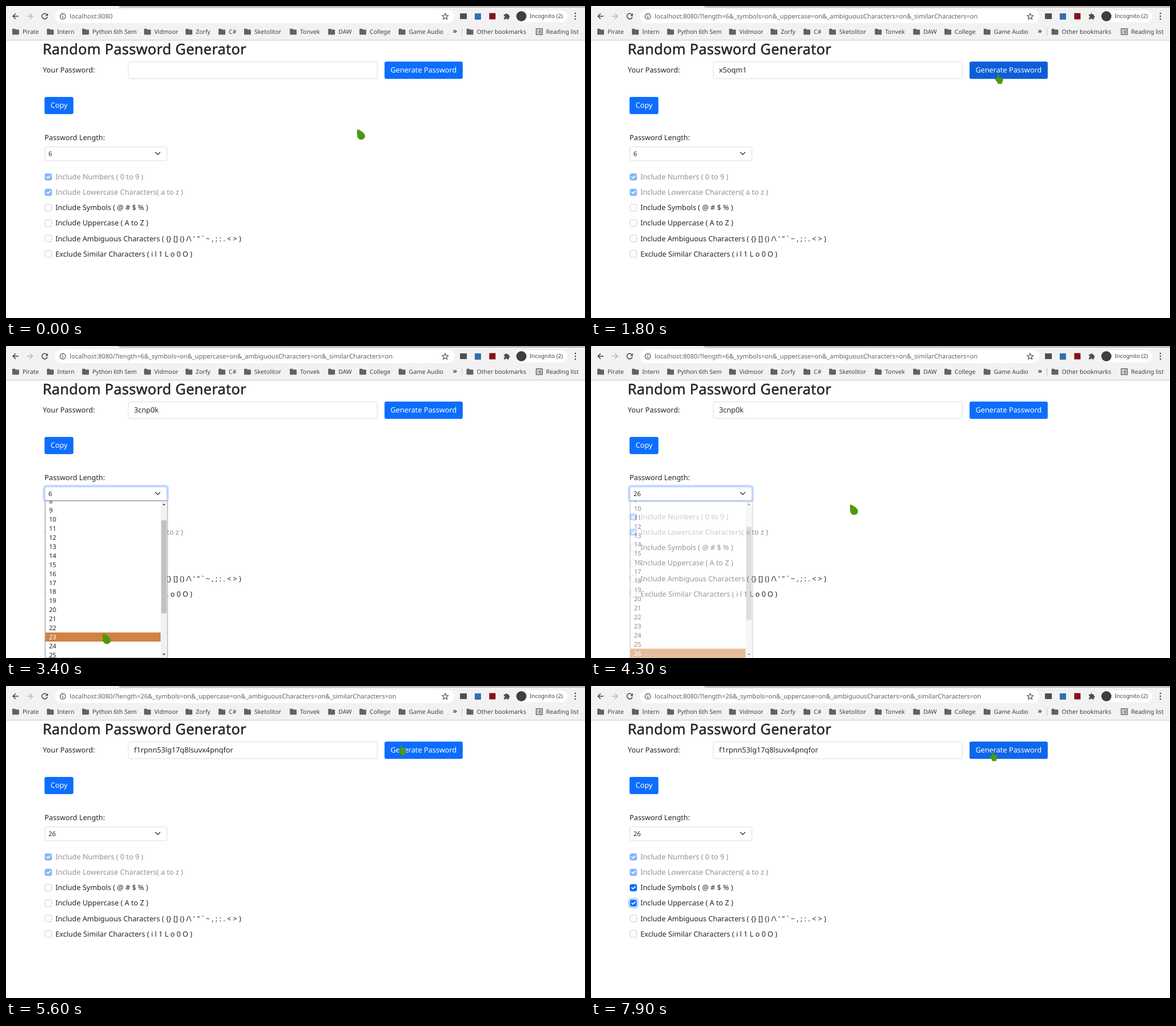
Animation, 1019 px wide and 549 px high, one loop 8000 ms. Source, as an HTML page:

```html
<!DOCTYPE html>
<html lang="en">
<head>
<meta charset="utf-8">
<title>Random Password Generator</title>
<style>
  html, body { margin: 0; width: 100%; height: 100%; overflow: hidden; background: #fff; }
  svg { display: block; }
  text { font: 12.74px "Noto Sans", sans-serif; fill: #212529; text-rendering: geometricPrecision; }
  .title { font-size: 25.47px; letter-spacing: .28px; stroke: #212529; stroke-width: .5; }
  .small { font-size: 11.15px; }
  .url { font-size: 11.15px; fill: #5f6368; }
  .mark { font-size: 10.5px; fill: #3c4043; }
  .white { fill: #fff; }
  .icon { fill: none; stroke: #3c4043; stroke-width: 1.5; }
  .field { fill: #fff; stroke: #ced4da; stroke-width: .8; }
  .ring { fill: none; stroke: #0d6efd; stroke-opacity: .25; stroke-width: 3.2; }
</style>
</head>
<body>
<svg id="stage" width="1019" height="549" viewBox="0 0 1019 549">
  <!-- browser bar -->
  <rect width="1019" height="60" fill="#f2f2f2"/>
  <path d="M0 0H4Q1 0 0 3ZM197 0H1019V3H205Q199 3 197 0Z" fill="#bdbdbd"/>
  <rect y="59.6" width="1019" height="1" fill="#c6c6c6"/>
  <rect x="86" y="6" width="703" height="24" rx="12" fill="#fff"/>
  <path class="icon" d="M22 18H12.5M17 13.2L12.2 18L17 22.8"/>
  <path class="icon" style="stroke:#b5b7b9" d="M37 18H46.5M42 13.2L46.8 18L42 22.8"/>
  <g id="reload">
    <path class="icon" d="M71.5 14.6A4.8 4.8 0 1 0 72.7 19.2"/>
    <path d="M73.6 12.8V17.4H69Z" fill="#3c4043"/>
  </g>
  <path id="stop" class="icon" d="M64 14L72 22M72 14L64 22"/>
  <circle class="icon" cx="100" cy="18.2" r="4.8" style="stroke-width:1.1"/>
  <path class="icon" style="stroke-width:1.2" d="M100 15.2V16.6M100 17.6V21"/>
  <text id="url" class="url" x="112.1" y="22"></text>
  <path class="icon" style="stroke-width:1.1" d="M773 13L774.5 16.6L778.3 16.9L775.4 19.4L776.3 23.2L773 21.1L769.7 23.2L770.6 19.4L767.7 16.9L771.5 16.6Z"/>
  <rect x="799" y="13" width="12" height="10" fill="#4b4f53"/>
  <rect x="825" y="13" width="11" height="11" fill="#2f6fae"/>
  <rect x="850.5" y="12.5" width="11" height="11" fill="#86101a"/>
  <path d="M876.3 14.8H879A1.7 1.7 0 0 1 882.4 14.8H885V17.3A1.7 1.7 0 0 1 885 20.7V23.6H882.2A1.7 1.7 0 0 0 878.8 23.6H876.3V20.8A1.7 1.7 0 0 0 876.3 17.4Z" fill="#4b4f53"/>
  <rect x="896" y="7.5" width="92" height="21.5" rx="10.7" fill="#fff"/>
  <circle cx="907" cy="18" r="9" fill="#3c4043"/>
  <text class="mark" x="921.7" y="21.3" style="font-size:9.85px">Incognito (2)</text>
  <path d="M1002 13v.01M1002 18v.01M1002 23v.01" stroke="#3c4043" stroke-width="2.6" stroke-linecap="round"/>
  <g id="bookmarks"></g>
  <text class="mark" x="786.5" y="48" style="font-size:12px;font-weight:600">»</text>
  <path d="M802.5 39V52" stroke="#c4c6c9"/>
  <path class="icon" style="stroke-width:1.2" d="M933.2 40.2H943.8V50.5H933.2ZM935 43H936.3M937.5 43H942M935 45.4H936.3M937.5 45.4H942M935 47.8H936.3M937.5 47.8H942"/>
  <text class="mark" x="950.5" y="49">Reading list</text>

  <!-- page -->
  <text class="title" x="64.4" y="85.3">Random Password Generator</text>
  <text x="64.8" y="117.3">Your Password:</text>
  <rect class="field" x="215.2" y="98.2" width="438.2" height="29.6" rx="3"/>
  <text id="password" x="225.3" y="117.3"></text>
  <rect id="buttonRing" class="ring" x="664.7" y="96.2" width="140.6" height="33.6" rx="4.8"/>
  <rect id="button" x="666.2" y="97.8" width="137.6" height="30.4" rx="3.2"/>
  <text class="white" x="734.9" y="117.3" text-anchor="middle">Generate Password</text>
  <rect x="67.8" y="160" width="50.8" height="30.3" rx="3.2" fill="#0d6efd"/>
  <text class="white" x="93.3" y="179.3" text-anchor="middle">Copy</text>
  <text x="67.8" y="235.5">Password Length:</text>
  <rect id="selectRing" class="ring" x="66.5" y="246" width="218.5" height="28" rx="4.8"/>
  <rect id="select" class="field" x="68.4" y="247.9" width="214.8" height="24.2" rx="3"/>
  <text id="length" class="small" x="74.8" y="263.6"></text>
  <path d="M263 257.6L267 261.6L271 257.6" fill="none" stroke="#343a40" stroke-width="1.4" stroke-linecap="round" stroke-linejoin="round"/>
  <g id="options"></g>

  <!-- length list -->
  <g id="popup">
    <rect x="68.9" y="272.4" width="215.2" height="276.6" fill="#fff" stroke="#767676" stroke-width=".9"/>
    <svg x="69.3" y="272.8" width="203" height="277" viewBox="69.3 272.8 203 277"><g id="list"></g></svg>
    <rect x="272.3" y="272.8" width="11.4" height="276" fill="#f1f1f1"/>
    <rect id="thumb" x="273.3" y="283.7" width="9.4" height="163.5" fill="#c1c1c1"/>
    <path d="M275.3 280L278 277L280.7 280ZM275.3 541.2L278 544.2L280.7 541.2Z" fill="#505050"/>
  </g>

  <g id="cursor" fill="#4e9a06" stroke="#3f8205" stroke-width=".5">
    <path id="leaf" d="M.5 .3C6 2 13.8 7 13.6 12C13.4 16.5 9.5 18 7 17.9C2.5 17.7 .3 14.5 .3 10C.3 6 -.4 3 .5 .3Z"/>
    <path id="hand" d="M4 1.3C4 -.2 6.4 -.2 6.5 1.3L6.8 6L11.5 6.6C13.8 7 14.3 8.5 13.8 11L12.2 14V16.8H5V15L.6 9.8C-.2 8 1.5 7.2 2.6 8.3L4.2 9.8Z"/>
  </g>
</svg>
<script>
const $ = id => document.getElementById(id);
const ROW = 15.93, SCROLL = 58, LOOP = 8000;

const bookmarks = [
  [11, "Pirate"], [72, "Intern"], [134, "Python 6th Sem"], [243, "Vidmoor"], [316, "Zorfy"], [374, "C#"],
  [419, "Sketolitor"], [499.5, "Tonvek"], [567, "DAW"], [622, "College"], [691, "Game Audio"], [810.5, "Other bookmarks"]
];
$("bookmarks").innerHTML = bookmarks.map(([x, name]) => `
  <path transform="translate(${x} 40)" d="M1 0H4.7L6 1.5H11Q12 1.5 12 2.5V9.5Q12 10.5 11 10.5H1Q0 10.5 0 9.5V1Q0 0 1 0Z" fill="#5f6368"/>
  <text class="mark" x="${x + 18}" y="49">${name}</text>`).join("");

const labels = [
  "Include Numbers ( 0 to 9 )",
  "Include Lowercase Characters( a to z )",
  "Include Symbols ( @ # $ % )",
  "Include Uppercase ( A to Z )",
  "Include Ambiguous Characters ( {} [] () /\\ ' \" ` ~ , ; : . &lt; &gt; )",
  "Exclude Similar Characters ( i l 1 L o 0 O )"
];
$("options").innerHTML = labels.map((label, i) => `
  <g transform="translate(68.2 ${294.5 + 27.06 * i})" opacity="${i < 2 ? .5 : 1}">
    <rect class="ring" x="-1.6" y="-1.6" width="15.9" height="15.9" rx="4.8" opacity="0"/>
    <rect class="box" x=".4" y=".4" width="11.9" height="11.9" rx="2.8" stroke-width=".8"/>
    <path class="tick" d="M3.8 6.4L5.7 8.3L9.6 4.4" fill="none" stroke="#fff" stroke-width="1.8" stroke-linecap="round" stroke-linejoin="round"/>
    <text x="18.7" y="10.8">${label}</text>
  </g>`).join("");
const options = [...$("options").children];

$("list").innerHTML = `<rect id="highlight" x="69" width="204" height="${ROW}" fill="#cf8344"/>` +
  Array.from({ length: 27 }, (_, i) =>
    `<text class="small" x="75.7" y="${(284 + ROW * i).toFixed(2)}">${i + 6}</text>`).join("");
const rows = [...$("list").querySelectorAll("text")];

// Pointer stops: time, x, y
const path = [
  [100, 618, 217], [700, 711, 120], [1900, 711, 120], [2500, 213, 260], [2800, 213, 260], [2900, 210, 271],
  [3000, 209, 275], [3500, 166, 533], [3600, 166, 533], [3700, 164, 535], [4100, 164, 535], [4300, 456, 279],
  [4500, 650, 150], [4700, 697, 112], [5400, 697, 112], [5600, 690, 105], [6200, 150, 372], [6300, 133, 365],
  [6500, 131, 352], [6900, 129, 378], [7200, 129, 378], [7800, 699, 117], [7900, 701, 115]
];

const clamp = v => Math.max(0, Math.min(1, v));
const mix = (a, b, k) => a + (b - a) * k;
const within = (t, a, b) => t >= a && t < b;
const show = (el, on) => el.setAttribute("opacity", Number(on));

function pointer(t) {
  const n = path.findIndex(p => p[0] > t);
  if (n === 0) return path[0].slice(1);
  if (n < 0) return path[path.length - 1].slice(1);
  const [a, b] = [path[n - 1], path[n]];
  const u = (t - a[0]) / (b[0] - a[0]), k = u * u * (3 - 2 * u);
  return [mix(a[1], b[1], k), mix(a[2], b[2], k)];
}

function draw(t) {
  const ramp = start => clamp((t - start) / 150);

  const query = n => `/?length=${n}&_symbols=on&_uppercase=on&_ambiguousCharacters=on&_similarCharacters=on`;
  $("url").textContent = "localhost:8080" + (t < 900 ? "" : query(t < 5000 ? 6 : 26));
  $("password").textContent = t < 900 ? "" : t < 2000 ? "x5oqm1" : t < 5000 ? "3cnp0k" : "f1rpnn53lg17q8lsuvx4pnqfor";
  $("length").textContent = t < 4200 ? 6 : 26;

  const loading = within(t, 800, 1000) || within(t, 1900, 2000) || within(t, 4900, 5100);
  show($("stop"), loading);
  show($("reload"), !loading);

  const hover = ramp(600) - ramp(850) + ramp(950) - ramp(2000) + ramp(4600) - ramp(4900) + ramp(5000) - ramp(5450) + ramp(7830);
  $("button").setAttribute("fill", `rgb(${mix(13, 11, hover)},${mix(110, 94, hover)},${mix(253, 215, hover)})`);
  show($("buttonRing"), within(t, 800, 900) || within(t, 4800, 5000));

  const focus = ramp(2750) - ramp(4750);
  $("selectRing").setAttribute("opacity", focus);
  $("select").style.stroke = focus > .5 ? "#86b7fe" : "#ced4da";

  options.forEach((option, i) => {
    const checked = i < 2 || (i === 2 && t >= 6500) || (i === 3 && t >= 7200);
    const focused = (i === 2 && within(t, 6500, 7200)) || (i === 3 && t >= 7200);
    const box = option.querySelector(".box");
    box.setAttribute("fill", checked ? "#0d6efd" : "#fff");
    box.setAttribute("stroke", focused ? "#86b7fe" : checked ? "#0d6efd" : "#bfbfbf");
    show(option.querySelector(".tick"), checked);
    show(option.querySelector(".ring"), focused);
  });

  const scroll = SCROLL * clamp((t - 3200) / 300);
  const pointed = pointer(Math.min(t, 4100))[1];
  const row = Math.max(0, Math.floor((pointed - 272 + scroll) / ROW));
  $("popup").setAttribute("opacity", t < 2900 ? 0 : clamp((4410 - t) / 210));
  $("list").setAttribute("transform", `translate(0 ${-scroll})`);
  $("thumb").setAttribute("y", 283.7 + scroll * .595);
  $("highlight").setAttribute("y", 272 + ROW * row);
  rows.forEach((text, i) => text.classList.toggle("white", i === row));

  const [x, y] = pointer(t);
  const overButton = within(x, 667, 804) && within(y, 97, 128);
  $("cursor").setAttribute("transform", `translate(${x} ${y})`);
  show($("hand"), overButton);
  show($("leaf"), !overButton);
}

function tick() {
  draw(Math.floor(performance.now() % LOOP / 100) * 100);
  requestAnimationFrame(tick);
}
tick();
</script>
</body>
</html>
```
